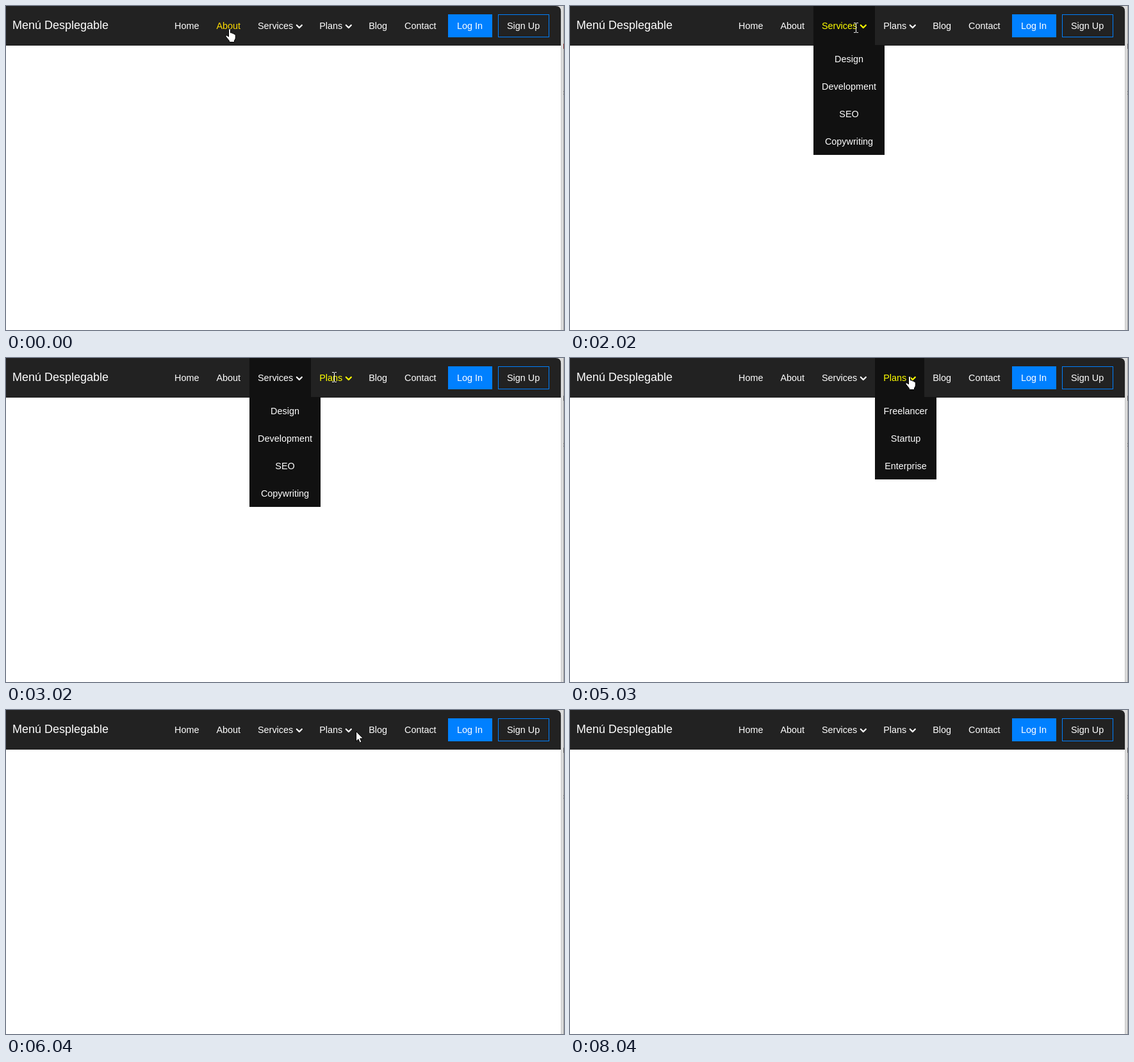
An HTML page that plays this animation: 871 by 507 pixels, repeating every 9.04 s.

```html
<!DOCTYPE html>
<html lang="es">
<head>
<meta charset="utf-8">
<title>Menú Desplegable</title>
<style>
html, body { margin: 0; width: 100%; height: 100%; overflow: hidden; background: #fff; }
svg { display: block; font: 14.4px "Liberation Sans", Arial, sans-serif; fill: #fff; }
.chevron { fill: none; stroke: #fff; stroke-width: 2.2; stroke-linecap: round; stroke-linejoin: round; }
.menu { fill: #111; }
.menu text { fill: #fff; text-anchor: middle; }
.cursor { stroke: #000; stroke-linejoin: round; }
</style>
</head>
<body>
<svg width="871" height="507" viewBox="0 0 871 507">
  <rect width="871" height="507"/>
  <rect x="866" width="5" height="507" fill="#dcdcdc"/>
  <rect x="858" width="8" height="8" fill="#dcdcdc"/>
  <path d="M866.5 8V507" stroke="#c8c8c8"/>
  <path d="M870.5 0V507" stroke="#a0a0a0"/>
  <rect id="mark" x="870" y="59" width="1" height="8"/>
  <path d="M870.5 133v2m0 2v2" stroke="#777"/>
  <path d="M0 0H858Q866 0 866 8V62H0Z" fill="#222"/>
  <text x="10" y="36" font-size="18">Menú Desplegable</text>
  <g id="menus"></g>
  <g id="links"></g>
  <rect x="690" y="13" width="69" height="36" fill="#0080ff"/>
  <rect x="768.5" y="13.5" width="79" height="35" fill="none" stroke="#0080ff"/>
  <text x="704" y="36">Log In</text>
  <text x="782" y="36">Sign Up</text>
  <path id="hand" class="cursor" d="M5.5 12V2.5Q5.5 .5 7 .5T8.5 2.5V7Q10.8 6 11.3 8Q13.4 7 13.8 9Q16.3 8.5 16.3 11V15Q16.3 17 14.5 19V21.5H6.5V19.5L2 14Q.2 11.8 1.2 11Q2.5 10 5.5 13Z"/>
  <path id="arrow" class="cursor" d="M.5 .5V16L4 12.7L6.3 18.2L9 17L6.7 11.7H11.5Z"/>
  <path id="beam" fill="none" stroke="#fff" d="M0 .5H3M4 .5H7M3.5 1V15M0 15.5H3M4 15.5H7"/>
</svg>
<script>
const $ = id => document.getElementById(id);

const links = [
  ["Home", 263], ["About", 328.4], ["Services", 393, 453.8],
  ["Plans", 489.2, 530.8], ["Blog", 566.2], ["Contact", 622]
];
const menus = {
  Services: { x: 380, tab: 96, width: 111, items: ["Design", "Development", "SEO", "Copywriting"] },
  Plans: { x: 476, tab: 77, width: 96, items: ["Freelancer", "Startup", "Enterprise"] }
};

$("links").innerHTML = links.map(([name, x, chevron]) =>
  `<g id="${name}"><text x="${x}" y="36">${name}</text>` +
  (chevron ? `<path class="chevron" d="M${chevron} 30l4 4l4 -4"/>` : "") + "</g>").join("");

$("menus").innerHTML = Object.entries(menus).map(([name, { x, tab, width, items }]) =>
  `<g class="menu" id="menu${name}"><rect x="${x}" width="${tab}" height="62"/>` +
  `<rect x="${x}" y="61" width="${width}" height="${items.length * 43}"/>` +
  items.map((item, i) => `<text x="${x + width / 2}" y="${88 + i * 43}">${item}</text>`).join("") +
  "</g>").join("");

// Each step holds until its end time.
const steps = [
  { end: 1000, hover: "About", color: "#ffdc00", cursor: "hand", x: 342, y: 35 },
  { end: 2020, hover: "Services", cursor: "beam", x: 427, y: 20 },
  { end: 3020, hover: "Services", menu: "Services", cursor: "beam", x: 443, y: 26 },
  { end: 4030, hover: "Plans", menu: "Services", cursor: "beam", x: 509, y: 22 },
  { end: 5030, hover: "Plans", menu: "Plans", cursor: "beam", x: 523, y: 22 },
  { end: 6040, hover: "Plans", menu: "Plans", cursor: "hand", x: 523, y: 28 },
  { end: 7020, cursor: "arrow", x: 546, y: 33 },
  { end: 8040, hover: "Blog", cursor: "hand", x: 573, y: 30 },
  { end: 9040 }
];

const show = (id, on) => $(id).style.display = on ? "" : "none";

function draw() {
  const t = performance.now() % 9040;
  const step = steps.find(s => t < s.end);
  for (const [name] of links) {
    const color = name === step.hover ? step.color || "#ff0" : "#fff";
    $(name).style.fill = color;
    const chevron = $(name).querySelector("path");
    if (chevron) chevron.style.stroke = color;
  }
  for (const name in menus) show("menu" + name, name === step.menu);
  for (const id of ["hand", "arrow", "beam"]) show(id, id === step.cursor);
  if (step.cursor) $(step.cursor).setAttribute("transform", `translate(${step.x} ${step.y})`);
  $("mark").style.fill = t < 2020 ? "#722" : "#555";
  requestAnimationFrame(draw);
}
draw();
</script>
</body>
</html>
```
